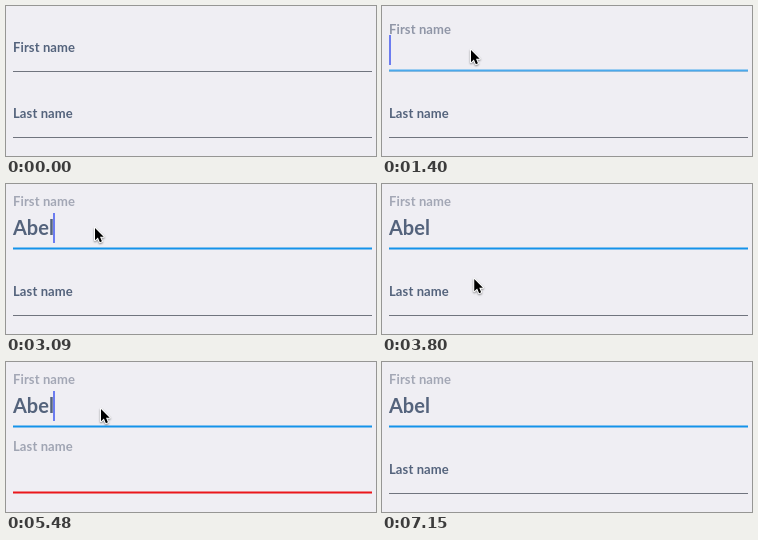
An HTML page with a canvas for the animation above (7.42 s loop, 370 by 150 pixels).

```html
<!DOCTYPE html>
<html lang="en">
<head>
<meta charset="utf-8">
<title>Floating labels</title>
<style>
html, body { margin: 0; width: 100%; height: 100%; overflow: hidden; background: #efeef3; }
canvas { display: block; width: 370px; height: 150px; }
</style>
</head>
<body>
<canvas id="stage"></canvas>
<script>
const W = 370, H = 150, LOOP = 7420;
const FONT = 'Lato, "Open Sans", sans-serif';
const INK = [84, 99, 124], FADED = [163, 167, 181];
const canvas = document.getElementById('stage');
const ctx = canvas.getContext('2d');
const dpr = window.devicePixelRatio || 1;
canvas.width = W * dpr;
canvas.height = H * dpr;

const NAME = 'Abel';
const keystrokes = [2380, 2550, 2820, 3090];
const clicks = [1240, 4230, 5580];
const resets = [...clicks, ...keystrokes].sort((a, b) => a - b);

// Each move bends from one rest point to the next through `via`.
const moves = [
  { start: 180, end: 780, from: [138, 119], via: [92, 5], to: [88, 42] },
  { start: 3570, end: 3890, from: [88, 42], via: [90, 73], to: [92, 105] },
  { start: 4500, end: 4980, from: [92, 105], via: [93, 75], to: [94, 45] },
  { start: 5620, end: 6360, from: [94, 45], via: [308, 78], to: [344, 153] }
];

const clamp = v => Math.max(0, Math.min(1, v));
const mix = (a, b, p) => a + (b - a) * p;
const blend = (a, b, p) => `rgb(${a.map((v, i) => Math.round(mix(v, b[i], p)))})`;

function ease(t, start, end) {
  const p = clamp((t - start) / (end - start));
  return p * p * (3 - 2 * p);
}

// Solid after each click or key, then fading out and in.
function caretAlpha(t) {
  if (t < 1140) return 0;
  const last = resets.filter(r => r <= t).pop() || t;
  const idle = t - last - 420;
  if (idle < 0) return 1;
  const u = idle % 920, fade = 120;
  return clamp(Math.max(1 - u / fade, (u - 460) / fade));
}

function pointerAt(t) {
  const m = moves.filter(k => k.start <= t).pop();
  const p = ease(t, m.start, m.end);
  return m.from.map((v, i) => mix(mix(v, m.via[i], p), mix(m.via[i], m.to[i], p), p));
}

function text(str, y, size, color, spacing) {
  ctx.font = `700 ${size}px ${FONT}`;
  ctx.letterSpacing = spacing + 'px';
  ctx.fillStyle = color;
  ctx.fillText(str, 7, y);
}

function bar(x, y, w, h, color, alpha) {
  ctx.globalAlpha = alpha;
  ctx.fillStyle = color;
  ctx.fillRect(x, y, w, h);
  ctx.globalAlpha = 1;
}

function field(label, top, p, accent) {
  bar(7, top + 65, 359, 1, '#70747e', 1 - p);
  bar(7, top + 63.5, 359, 2, accent, p);
  text(label, top + mix(46, 22, p), 13, blend(INK, FADED, p), 0.12);
}

const arrow = new Path2D('M0 0V12.2L2.9 9.6L4.9 14.2L6.9 13.3L5 8.8H8.7Z');
function pointer(x, y) {
  ctx.save();
  ctx.translate(x + 1, y + 2);
  ctx.lineJoin = 'round';
  ctx.lineWidth = 2;
  ctx.strokeStyle = '#fff';
  ctx.shadowColor = 'rgba(0,0,0,.45)';
  ctx.shadowBlur = 2 * dpr;
  ctx.shadowOffsetY = dpr;
  ctx.stroke(arrow);
  ctx.shadowColor = 'transparent';
  ctx.fillStyle = '#000';
  ctx.fill(arrow);
  ctx.restore();
}

function draw(t) {
  ctx.setTransform(dpr, 0, 0, dpr, 0, 0);
  bar(0, 0, W, H, '#efeef3', 1);

  const first = ease(t, 1110, 1540);
  const last = ease(t, 4110, 4340) - ease(t, 5450, 5740);
  field('First name', 0, first, '#1493ea');
  field('Last name', 66, last, '#ec1014');

  const typed = NAME.slice(0, keystrokes.filter(k => k <= t).length);
  text(typed, 51, 20, blend(INK, INK, 0), 0);
  const end = 7 + ctx.measureText(typed).width;

  const onLast = t >= 4150 && t < 5480;
  bar(onLast ? 7 : Math.floor(end), onLast ? 95 : 29, 2, 30, '#6c7cf0', caretAlpha(t));
  if (t >= 180 && t < 6360) pointer(...pointerAt(t));
}

const begin = performance.now();
function tick() {
  draw((performance.now() - begin) % LOOP);
  requestAnimationFrame(tick);
}
tick();
</script>
</body>
</html>
```
